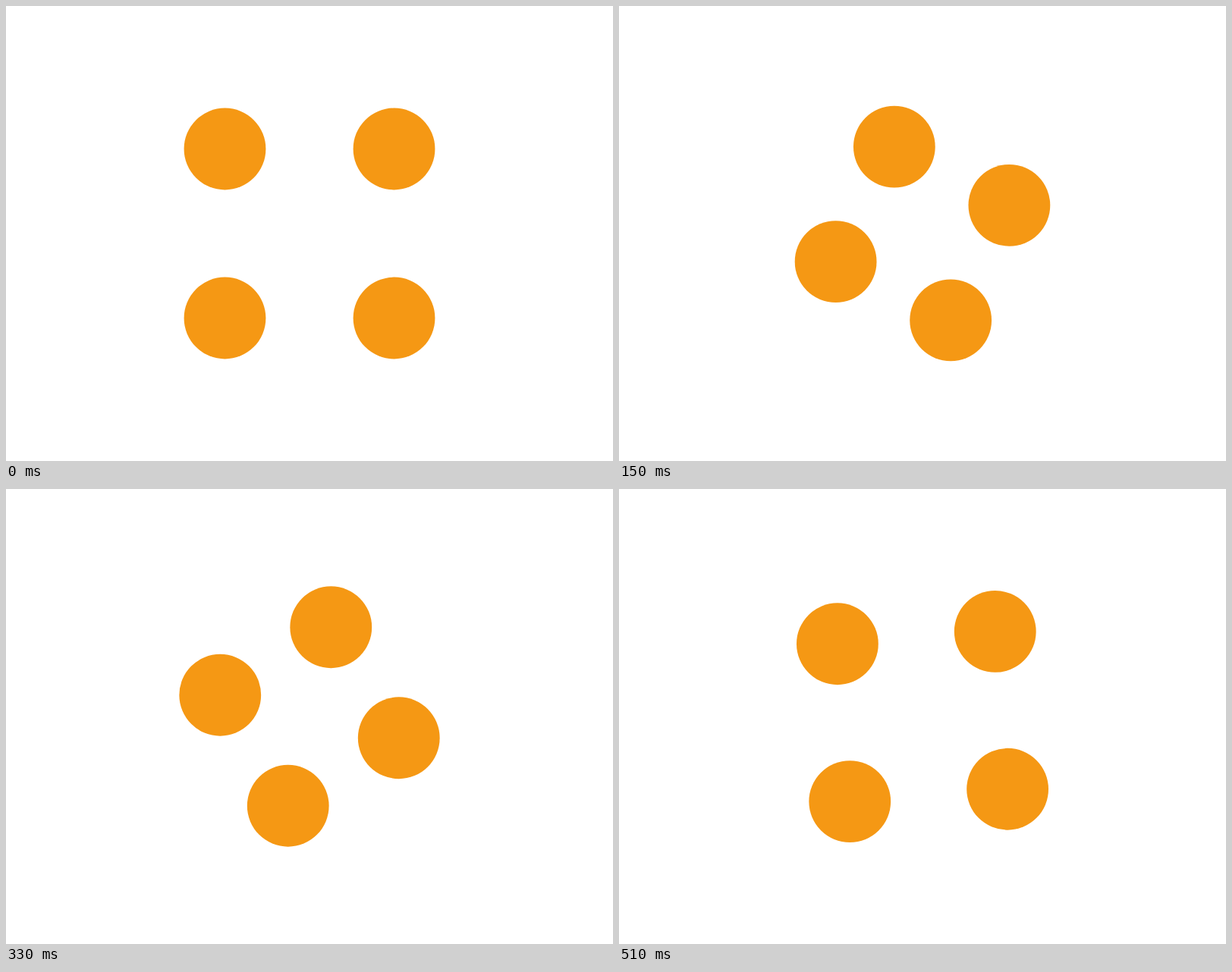
An HTML page that plays this animation: 800 by 600 pixels, repeating every 0.54 s.

```html
<!DOCTYPE html>
<html lang="en">
<head>
<meta charset="utf-8">
<title>Four dots loader</title>
<style>
  html, body { margin: 0; width: 100%; height: 100%; overflow: hidden; background: #fff; }
  svg { display: block; width: 800px; height: 600px; fill: #f59814; }
</style>
</head>
<body>
<svg viewBox="0 0 800 600">
  <circle r="53.9"/>
  <circle r="53.9"/>
  <circle r="53.9"/>
  <circle r="53.9"/>
</svg>
<script>
  const LOOP = 540, STEP = 30, INNER = 102.8;
  const dots = document.querySelectorAll('circle');

  // Distance of the dots from the centre: they draw in, then spread out again.
  function spread(pose) {
    if (pose <= 10) return INNER + 54.9 * Math.pow(1 - pose / 10, 1.25);
    const u = pose - 10;
    return INNER + 6.67 * u - 0.19 * u * u;
  }

  function draw(time) {
    const step = Math.floor((time % LOOP) / STEP);
    // Twenty poses of 4.5 degrees in eighteen steps; two poses are skipped.
    const pose = Math.ceil(step * 10 / 9);
    const r = spread(pose);
    dots.forEach((dot, i) => {
      const angle = (pose * 4.5 - 135 + i * 90) * Math.PI / 180;
      dot.setAttribute('cx', 400 + r * Math.cos(angle));
      dot.setAttribute('cy', 300 + r * Math.sin(angle));
    });
  }

  const start = performance.now();
  function tick() {
    draw(performance.now() - start);
    requestAnimationFrame(tick);
  }
  tick();
</script>
</body>
</html>
```
